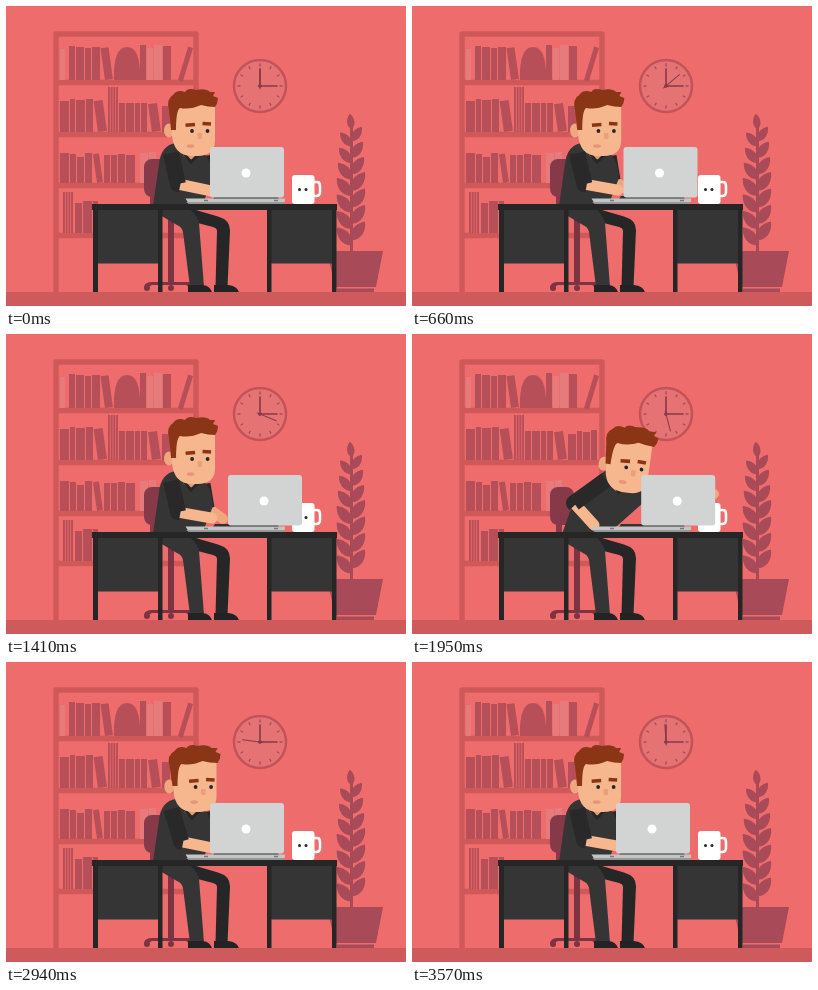
An HTML page that plays this animation: 400x300 px, repeating every 3.6 s.

```html
<!DOCTYPE html>
<html lang="en">
<head>
<meta charset="utf-8">
<title>Typing at the desk</title>
<style>
html, body { margin: 0; width: 100%; height: 100%; overflow: hidden; background: #ee6c6c; }
svg { display: block; width: 400px; height: 300px; }
</style>
</head>
<body>
<svg viewBox="0 0 400 300" width="400" height="300">
  <rect width="400" height="300" fill="#ee6c6c"/>
  <rect y="286" width="400" height="14" fill="#cf5a5b"/>
  <path d="M50 286V28H190V286M50 76.500H190M50 128.500H190M50 179.500H190M50 229.500H190" fill="none" stroke="#cf5859" stroke-width="5.500" stroke-linejoin="round"/>
  <g id="books" fill="#b74f58"></g>
  <path d="M108 74Q107 41 121 41Q135 41 134 74Z" fill="#b74f58"/>
  <g transform="translate(254 80)" stroke="#86394a" stroke-linecap="round">
    <circle r="26" fill="#e67373" stroke="#c15359" stroke-width="2.500"/>
    <g id="ticks" stroke="#a84a55" stroke-width="1.300"></g>
    <path d="M0 1V-17M-1 0H17" stroke-width="1.600"/>
    <path id="second" d="M0 3V-17.500"/>
    <circle r="1.800" fill="#86394a" stroke="none"/>
  </g>
  <g id="plant" fill="#a84a57">
    <path d="M344 114h3V246h-3z"/>
    <path d="M321 245H377L370 281H329ZM331 282.500H368V286H331Z"/>
  </g>
  <g fill="#863a49">
    <rect x="138" y="153" width="24" height="38" rx="8"/>
    <path d="M144 188h6v10h-6z"/>
    <g fill="#7c3342">
      <path d="M162 200h6v77h-6zM138 281Q139 276 146 276H182Q187 276 188 281H183L180 279H146L142 281Z"/>
      <circle cx="141" cy="282" r="3"/><circle cx="165" cy="282" r="3"/><circle cx="185" cy="282" r="3"/>
    </g>
  </g>
  <path d="M176 200L212 210.500Q224 214 224 224L221.500 281H209.500L211 225Q211 222 207 221L180 214Z" fill="#262626"/>
  <path d="M148 198H176Q191 206 193 217L198 281H184L177 226Q176 221 171 219L154 209Z" fill="#353535"/>
  <path d="M182 286V279H197Q204 280 206 286ZM208 286V279H222Q231 280 233 286Z" fill="#232323"/>
  <path id="farSkin" fill="none" stroke="#efa780" stroke-width="10" stroke-linecap="round" stroke-linejoin="round"/>
  <path id="farSleeve" fill="none" stroke="#272727" stroke-width="13" stroke-linejoin="round"/>
  <path id="torso" fill="#353535"/>
  <path id="neck" fill="none" stroke="#e39b75" stroke-width="15" stroke-linecap="round"/>
  <path id="collar" fill="none" stroke="#262626" stroke-width="3" stroke-linejoin="round"/>
  <g id="head">
    <ellipse id="ear" cx="163" cy="124.500" rx="5" ry="7" fill="#efa780"/>
    <path d="M166 96H209V134Q209 150 191 150H185Q168 149 166 130Z" fill="#f6b78f"/>
    <g id="face">
      <path d="M179.500 119.300L189 118.500M196.500 117.500L205 118" stroke="#8a3516" stroke-width="3.600"/>
      <circle cx="186" cy="125" r="1.900" fill="#262626"/>
      <circle cx="201.500" cy="125" r="1.900" fill="#262626"/>
      <path d="M191.500 127H196V132Q193.500 134.500 191.500 132Z" fill="#e89f7a"/>
      <ellipse cx="184.500" cy="140" rx="4" ry="1.800" fill="#e8937a"/>
    </g>
    <path id="hair" fill="#8a3516"/>
  </g>
  <path d="M91 203H153V257.500H91ZM265 203H327V257.500H265Z" fill="#353535"/>
  <path d="M86 198H331V204H86ZM87 203h5v83h-5zM152 203h4.500v83h-4.500zM261 203h4.500v83h-4.500zM326 203h4.500v83h-4.500z" fill="#262626"/>
  <path d="M307 176H311Q314 176 314 180V186Q314 190 310 190H307" fill="none" stroke="#fff" stroke-width="2.500"/>
  <rect x="286" y="169" width="22.500" height="29" rx="3" fill="#fff"/>
  <circle cx="293.500" cy="183.500" r="1.500" fill="#262626"/>
  <circle cx="300" cy="183.500" r="1.500" fill="#262626"/>
  <path id="nearSkin" fill="none" stroke="#f6b78f" stroke-width="11" stroke-linecap="round" stroke-linejoin="round"/>
  <path id="nearSleeve" fill="none" stroke="#292929" stroke-width="16" stroke-linejoin="round"/>
  <path d="M209 190H271L273 193H207Z" fill="#333"/>
  <path d="M179.500 192.500H279V195.500L276 198H183Z" fill="#c4c6c6"/>
  <path d="M180 196H279L276 198H183Z" fill="#959999"/>
  <path d="M198 194.500h4M268 194.500h4" stroke="#777" stroke-width="1.300"/>
  <g id="screen">
    <rect x="204" y="141" width="74" height="50.500" rx="3" fill="#d2d4d4"/>
    <circle cx="240" cy="167" r="4.500" fill="#fff"/>
  </g>
</svg>
<script>
const LOOP = 3600;
const $ = id => document.getElementById(id);
const ease = (t, a, b) => { const u = Math.max(0, Math.min(1, (t - a) / (b - a))); return u * u * (3 - 2 * u); };
const mix = (a, b, k) => a + (b - a) * k;
const mixAll = (a, b, k) => a.map((v, i) => mix(v, b[i], k));
const nums = p => p.map(v => v.toFixed(2)).join(' ');
const line = p => 'M' + nums(p);
const set = (id, d) => $(id).setAttribute('d', d);
const move = (id, x, y = 0, turn = '') => $(id).setAttribute('transform', `translate(${nums([x, y])}) ${turn}`);

let seed = 7;
const rnd = () => (seed = seed * 16807 % 2147483647) / 2147483647;

// Fill a shelf from x to end; books past `pale` are light, every ninth one leans
function fillShelf(floor, height, x, end, pale = 999) {
  let s = '';
  for (let i = 1; x < end - 4; i++) {
    const w = Math.min(5 + Math.floor(rnd() * 4.5), end - x);
    const h = height - Math.floor(rnd() * 5);
    const lean = i % 9 === 5;
    if (lean) x += 4;
    s += `<rect x="${x}" y="${floor - h}" width="${w}" height="${h}"` +
      (x >= pale ? ' fill="#e57c7b"' : '') +
      (lean ? ` transform="rotate(-8 ${x} ${floor})"` : '') + '/>';
    x += w + 1;
  }
  return s;
}
function striped(x, floor, h) {
  let s = '';
  for (let i = 0; i < 4; i++) s += `<rect x="${x + i * 2.7}" y="${floor - h}" width="1.900" height="${h}"/>`;
  return s;
}
$('books').innerHTML =
  fillShelf(74, 35, 54, 60, 54) + fillShelf(74, 35, 63, 106) +
  fillShelf(74, 36, 134, 140) + fillShelf(74, 35, 141, 156, 141) + fillShelf(74, 36, 157, 170) +
  '<rect x="172" y="39" width="5" height="35" transform="rotate(17 172 74)"/>' +
  fillShelf(126, 35, 54, 101) + striped(102, 126, 45) + fillShelf(126, 30, 113, 187) +
  fillShelf(177, 30, 54, 133) + fillShelf(177, 33, 134, 151, 134) +
  striped(57, 227, 41) + fillShelf(227, 33, 69, 92);

for (let i = 0; i < 12; i++)
  $('ticks').innerHTML += `<path d="M0 -22V-20" transform="rotate(${i * 30})"/>`;

const leaf = (y, a, s) =>
  `<path d="M0 0C-7 -4 -7 -15 0 -22C7 -15 7 -4 0 0Z" transform="translate(345.500 ${y}) rotate(${a}) scale(${s})"/>`;
let leaves = leaf(123, -6, .7);
for (let i = 0; i < 7; i++) {
  const s = .8 + Math.min(i, 3) * .08;
  leaves += leaf(140 + i * 16.5, -40, s) + leaf(135 + i * 16.5, 36, s);
}
$('plant').innerHTML += leaves;

// Each body part: upright pose, then leaning over the desk
const pose = {
  torso: [[147,200, 153,158, 155,139, 170,137, 190,143, 206,148, 207,172, 196,200],
          [150,200, 160,172, 172,150, 196,135, 212,139, 231,150, 232,168, 196,200]],
  neck: [[183,140, 184,146], [206,146, 207,150]],
  collar: [[173,142, 185,156, 194,147], [196,142, 207,158, 218,149]]
};

function draw(t) {
  const lean = ease(t, 1470, 1860) * (1 - ease(t, 2040, 2370));
  const reach = ease(t, 1530, 1880) * (1 - ease(t, 2070, 2220));

  // the screen moves one notch per 270 ms, then is shoved back
  const beat = t / 270, n = Math.floor(beat);
  const notch = Math.min(7, n + ease(beat - n, .35, .9));
  const dx = 3.6 * notch * (1 - ease(t, 2000, 2160));
  move('screen', dx);

  // the head turns to and fro while he types
  const late = t > 2160;
  const wave = (1 - Math.cos(2 * Math.PI * (late ? (t - 2160) / 480 : t / 720))) / 2;
  const sway = wave * (late ? .6 : 1) * (1 - lean);
  const tap = Math.sin(2 * Math.PI * t / 180) * (1 - reach);

  const p = mixAll(...pose.torso, lean);
  set('torso', `M${nums(p.slice(0, 4))}Q${nums(p.slice(4, 8))}L${nums(p.slice(8, 10))}Q${nums(p.slice(10, 14))}L${nums(p.slice(14))}Z`);
  for (const id of ['neck', 'collar']) {
    set(id, line(mixAll(...pose[id], lean)));
    move(id, 2 * sway);
  }

  move('head', 25 * lean + 3 * sway, 8 * lean, `rotate(${(8 * lean).toFixed(2)} 185 148)`);
  move('face', 4 * sway);
  move('ear', -2.5 * sway);
  const r = 2 * sway + 2 * lean, l = -2 * sway;
  set('hair', `M165 124L${163 + l} 104Q${160 + l} 93 167 89Q171 83 179 86Q182 81 190 84Q200 82 204 86L${209 + r} 86L${207 + r} 90L${212 + r} 92Q${212 + r} 97 ${209 + r} 101Q202 101 195 99Q184 104 174 102Q170 104 170 124Z`);

  // near arm: shoulder, elbow, hand
  const [sx, sy, ex, ey, hx, hy] = mixAll(
    [165 + sway, 147, 172 + 6 * sway, 178 + 3 * sway, 206, 185 + tap],
    [194, 146, 162, 169, 182, 191], Math.max(lean, reach));
  set('nearSleeve', line([sx, sy, ex, ey, mix(ex, hx, .07), mix(ey, hy, .07)]));
  set('nearSkin', line([ex, ey, hx, hy]));

  // far arm stretches behind the screen to its right edge
  const [ax, ay, bx, by, cx, cy] = mixAll(
    [198 + sway, 150, 202 + sway, 174, 217, 184 - tap],
    [222, 153, 246, 166, 276.8 + dx, 160], reach);
  set('farSleeve', line([ax, ay, bx, by]));
  set('farSkin', line([bx, by, cx, cy]));

  const u = t / LOOP;
  move('second', 0, 0, `rotate(${(360 * u - 30 * Math.sin(Math.PI * u)).toFixed(2)})`);
}

const start = performance.now();
function loop(now) {
  draw(Math.max(0, now - start) % LOOP);
  requestAnimationFrame(loop);
}
draw(0);
requestAnimationFrame(loop);
</script>
</body>
</html>
```
